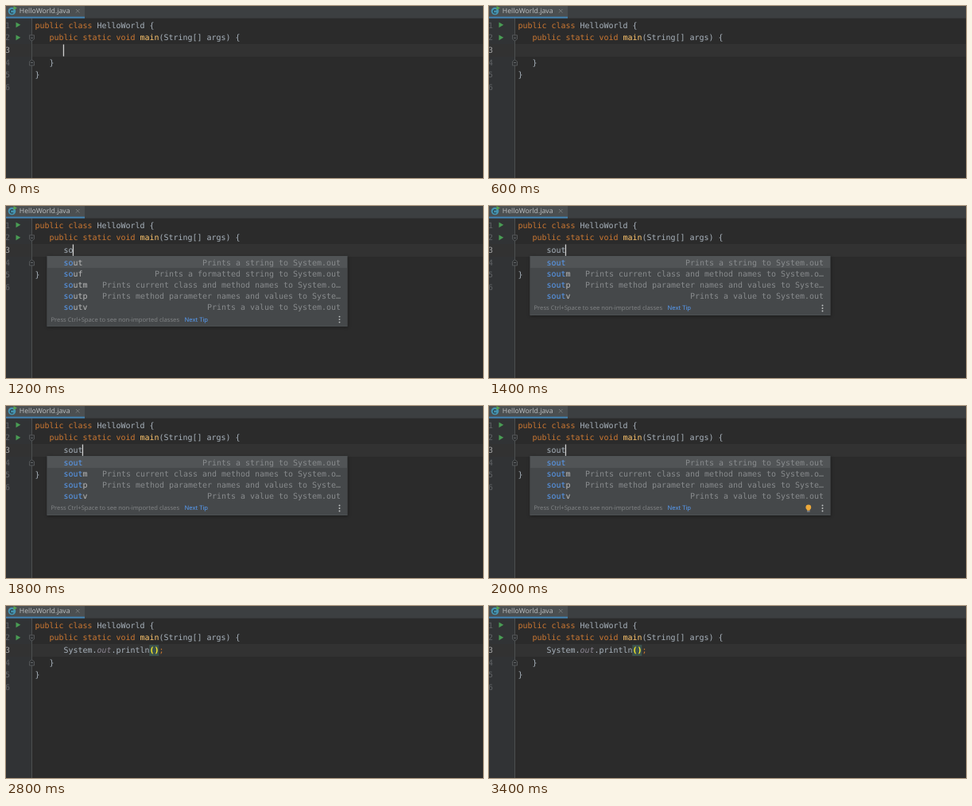
An HTML page with a canvas for the animation above (3800 ms loop, 600 by 217 pixels).

```html
<!DOCTYPE html>
<html lang="en">
<head>
<meta charset="utf-8">
<title>Live template</title>
<style>
html, body { margin: 0; width: 100%; height: 100%; overflow: hidden; background: #2b2b2b; }
canvas { display: block; }
</style>
</head>
<body>
<canvas id="stage" width="600" height="217"></canvas>
<script>
const g = document.getElementById('stage').getContext('2d');
g.textRendering = 'geometricPrecision';
const LOOP = 3800, CHAR = 6, LEFT = 36.4, LINE = 15.7;
const MONO = '9.97px "DejaVu Sans Mono", monospace';
const PLAIN = '#a9b3bd', KEY = '#cc7832', CALL = '#ffc66d', BRACE = '#ffef28';

const baseline = line => 27.5 + (line - 1) * LINE;
const column = n => LEFT + n * CHAR;

function rect(x, y, w, h, color) {
  g.fillStyle = color;
  g.fillRect(x, y, w, h);
}

function shape(points, color) {
  g.fillStyle = color;
  g.beginPath();
  points.forEach(([x, y]) => g.lineTo(x, y));
  g.fill();
}

function disc(x, y, r, color) {
  g.fillStyle = color;
  g.beginPath();
  g.arc(x, y, r, 0, Math.PI * 2);
  g.fill();
}

function stroke(points, color, width = 1) {
  g.strokeStyle = color;
  g.lineWidth = width;
  g.beginPath();
  points.forEach(([x, y], i) => i ? g.lineTo(x, y) : g.moveTo(x, y));
  g.stroke();
}

function label(text, x, y, size, color) {
  g.font = `${size}px "Noto Sans", sans-serif`;
  g.fillStyle = color;
  g.fillText(text, x, y);
}

// Monospaced text from [string, color, style] parts on a fixed grid
function mono(x, y, ...parts) {
  for (const [text, color, style = ''] of parts) {
    g.font = `${style} ${MONO}`;
    g.fillStyle = color;
    for (const c of text) {
      g.fillText(c, x, y);
      x += CHAR;
    }
  }
}

function tabBar() {
  rect(0, 0, 600, 15.5, '#3c3f41');
  rect(0, 0, 99, 13.5, '#4b4f51');
  rect(0, 13.5, 99, 2, '#4585b5');
  disc(7.5, 6.5, 4.8, '#4593b0');
  g.strokeStyle = '#283d46';
  g.lineWidth = 1.1;
  g.beginPath();
  g.arc(7.5, 6.8, 2.1, 0.8, 5.5);
  g.stroke();
  shape([[9.5, 0], [14, 2.5], [9.5, 5]], '#57a64a');
  label('HelloWorld.java', 16.8, 9, 8.65, '#b9bcbe');
  stroke([[88, 4], [92.5, 8.5]], '#7b7f81', 0.9);
  stroke([[92.5, 4], [88, 8.5]], '#7b7f81', 0.9);
}

function foldMark(y, dir) {
  const pts = [[29.5, y - 3.5 * dir], [35.5, y - 3.5 * dir], [35.5, y + 1.5 * dir],
    [32.5, y + 3.8 * dir], [29.5, y + 1.5 * dir], [29.5, y - 3.5 * dir]];
  shape(pts, '#2e3031');
  stroke(pts, '#5d6062', 0.8);
  stroke([[31, y], [34, y]], '#74777a', 0.8);
}

function editor() {
  rect(0, 15, 600, 202, '#2b2b2b');
  rect(0, 15, 32, 202, '#313335');
  rect(0, 48, 600, 16, '#323232');
  rect(32, 15, 1, 202, '#4d4f50');
  for (let n = 1; n <= 6; n++) {
    mono(-0.9, baseline(n), [String(n), n === 3 ? '#a4a3a3' : '#606366']);
  }
  for (const y of [23.8, 39.8]) {
    shape([[12.5, y - 3.4], [18.3, y], [12.5, y + 3.4]], '#499c54');
  }
  foldMark(40.3, 1);
  foldMark(71.5, -1);
  mono(LEFT, baseline(1), ['public class ', KEY], ['HelloWorld {', PLAIN]);
  mono(column(3), baseline(2), ['public static void ', KEY], ['main', CALL],
    ['(String[] args) {', PLAIN]);
  mono(column(3), baseline(4), ['}', PLAIN]);
  mono(LEFT, baseline(5), ['}', PLAIN]);
}

const HINTS = {
  sout: 'Prints a string to System.out',
  souf: 'Prints a formatted string to System.out',
  soutm: 'Prints current class and method names to System.o…',
  soutp: 'Prints method parameter names and values to Syste…',
  soutv: 'Prints a value to System.out'
};

function popup(typed, bulb) {
  const rows = Object.keys(HINTS).filter(name => name.startsWith(typed));
  const top = 63, step = 14.1, height = 18.6 + rows.length * step;
  const foot = top + height - 9;
  g.save();
  g.shadowColor = 'rgba(0,0,0,.4)';
  g.shadowBlur = 4;
  g.shadowOffsetY = 1;
  rect(51.5, top, 378, height, '#55585a');
  g.restore();
  rect(52, top + 0.5, 377, height - 1, '#45484a');
  rect(52, top + 0.5, 377, step + 0.5, '#515456');
  rows.forEach((name, i) => {
    const y = 74.7 + i * step, hint = HINTS[name];
    mono(column(6), y, [typed, '#589df6'], [name.slice(typed.length), '#bbbbbb']);
    mono(421 - hint.length * CHAR, y, [hint, '#888b8d']);
  });
  label('Press Ctrl+Space to see non-imported classes', 56.5, foot + 2.4, 7.62, '#808385');
  label('Next Tip', 224.5, foot + 2.4, 7.62, '#589df6');
  for (const d of [-3.5, 0, 3.5]) disc(419.5, foot + d, 0.95, '#c3c5c6');
  if (bulb) {
    disc(401.8, foot - 1.2, 3.4, '#eda93a');
    rect(400, foot + 1.5, 3.6, 1.3, '#eda93a');
    rect(400, foot + 3.5, 3.6, 1, '#a0a2a3');
  }
}

function statement(t) {
  rect(180.3, 49, 12, 14, '#3b514d');
  mono(column(6), baseline(3), ['System.', PLAIN],
    t < 2400 ? ['out', PLAIN] : ['out', '#8b8592', 'italic'],
    ['.println', PLAIN], ['()', BRACE, 'bold'], [';', KEY]);
}

function caret(t, chars) {
  const hidden = t >= 400 && t < 800 || t >= 2600 && t < 3200 || t >= 3400;
  if (!hidden) rect(71.8 + chars * CHAR, 48.5, 1.3, 15, '#d0d0d0');
}

function draw(t) {
  editor();
  tabBar();
  if (t >= 2200) {
    statement(t);
    caret(t, 19);
  } else {
    const typed = t < 1000 ? '' : t < 1200 ? 's' : t < 1400 ? 'so' : 'sout';
    mono(column(6), baseline(3), [typed, PLAIN]);
    caret(t, typed.length);
    if (t >= 1200) popup(typed, t >= 2000);
  }
}

const start = performance.now();
function tick() {
  draw((performance.now() - start) % LOOP);
  requestAnimationFrame(tick);
}
tick();
</script>
</body>
</html>
```
